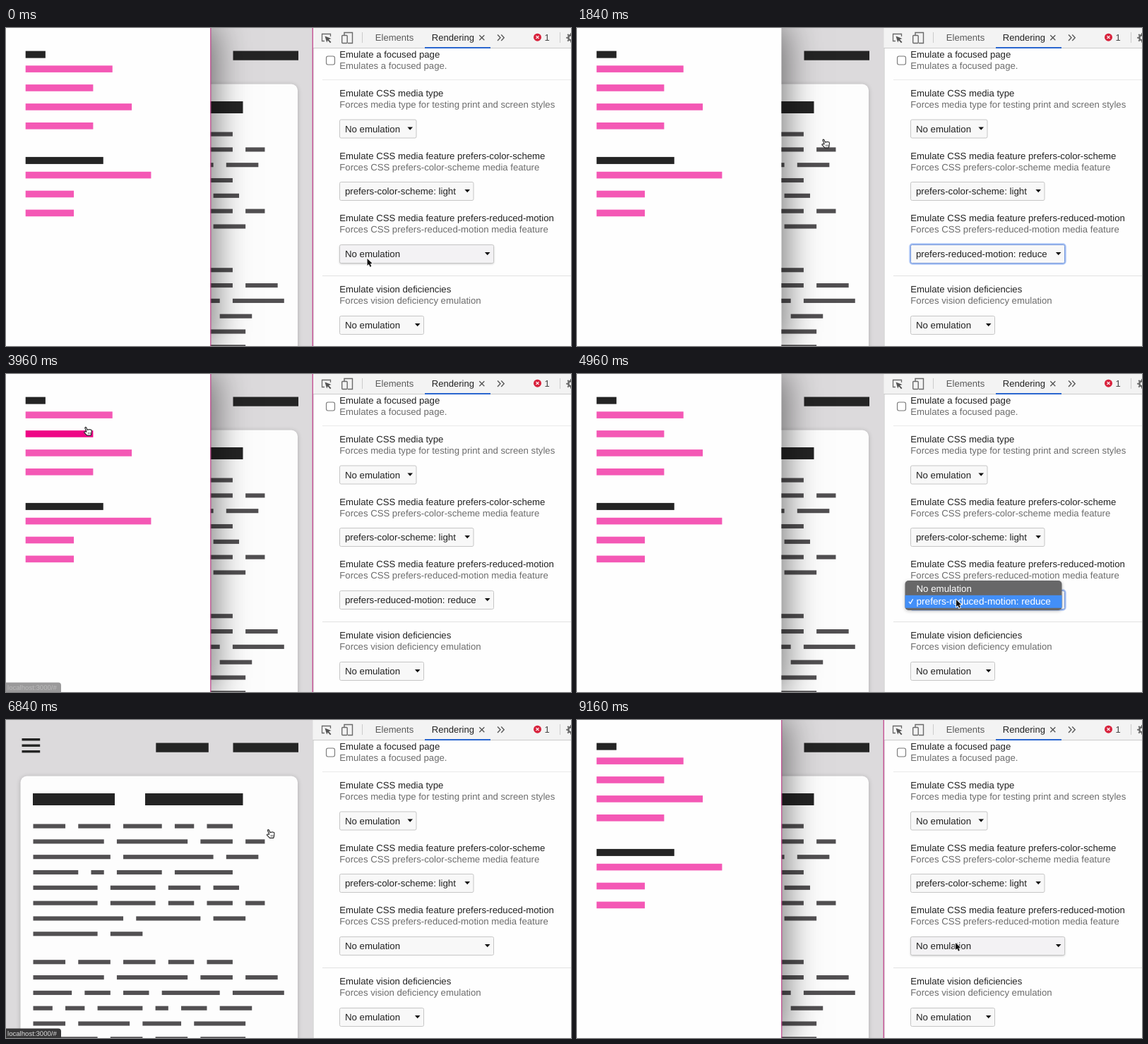
Animation of 800x451 px, one loop 9200 ms. Source, as an HTML page with a canvas:

```html
<!DOCTYPE html>
<html lang="en">
<head>
<meta charset="utf-8">
<title>Sidenav and reduced motion</title>
<style>
html, body { margin: 0; width: 100%; height: 100%; overflow: hidden; background: #fff; }
canvas { display: block; width: 800px; height: 451px; }
</style>
</head>
<body>
<canvas id="stage" width="800" height="451"></canvas>
<script>
const ctx = document.getElementById('stage').getContext('2d');
const LOOP = 9200, STEP = 40;
const PAGE_W = 434.5, NAV_W = 289.3;
const SLIDE = 600, AWAY = -478;
const INK = '#242424', PINK = '#f458b5', HOT = '#ee0585', RING = '#c2478f';
const SANS = '"Liberation Sans", Arial, sans-serif';

// Moments of each click
const AT = {
  menu1: 400, pick1: 1040, close1: 2250, open1: 3450,
  menu2: 4740, pick2: 5600, close2: 6520, open2: 7870
};

// Pointer path: time, x, y
const PATH = [
  [0, 511.5, 327], [360, 519, 322], [480, 519, 322], [860, 542, 338], [1160, 542, 338],
  [1800, 348.5, 157.5], [2400, 349, 157.5], [2960, 47.5, 37], [3760, 48, 37.5],
  [4640, 537, 321], [5020, 537, 320], [5400, 532, 303], [5720, 532, 303],
  [6260, 371, 155], [6880, 371, 155], [7500, 50, 40], [7720, 50, 40],
  [8100, 53.5, 44], [8320, 53.5, 44], [9000, 536, 316], [LOOP, 536, 316]
];

// Word lengths, line by line
const PARAGRAPHS = [
  [150.5, '5 5 6 3 4|11 11 5 3|12 14 5|7 2 7 9|10 7 5 4|10 7 4 4 3|14 10 5|10 5'],
  [343.2, '5 5 5 4 4|11 11 5 5|6 4 4 9 8|3 3 7 2 4 5|5 8 6 8|10 5 5 7']
];
const NAV_ITEMS = [
  [37.6, 2.06, 'head'], [58.1, 9], [84.9, 7], [111.9, 11], [138.8, 7],
  [187.9, 8.05, 'head'], [208.6, 13], [235.5, 5], [262.4, 5]
];

const between = (t, a, b) => t >= a && t < b;
const clamp = v => Math.max(0, Math.min(1, v));
const fade = (t, a, b, d = 120) => clamp((t - a) / d) * clamp((b + d - t) / d);

function bar(x, y, w, h, color) {
  ctx.fillStyle = color;
  ctx.fillRect(x, y, w, h);
}

function round(x, y, w, h, r, fill, stroke, lw = 1) {
  ctx.beginPath();
  ctx.roundRect(x, y, w, h, r);
  if (fill) { ctx.fillStyle = fill; ctx.fill(); }
  if (stroke) { ctx.strokeStyle = stroke; ctx.lineWidth = lw; ctx.stroke(); }
}

function line(points, color, lw = 1) {
  ctx.beginPath();
  points.forEach(([x, y], i) => i ? ctx.lineTo(x, y) : ctx.moveTo(x, y));
  ctx.strokeStyle = color;
  ctx.lineWidth = lw;
  ctx.stroke();
}

function label(str, x, y, color = '#222', size = 13.16) {
  ctx.font = `${size}px ${SANS}`;
  ctx.textRendering = 'geometricPrecision';
  ctx.fillStyle = color;
  ctx.fillText(str, x, y);
}

function shadow(color, blur, dy = 0) {
  ctx.shadowColor = color;
  ctx.shadowBlur = blur;
  ctx.shadowOffsetY = dy;
}

// cubic-bezier(.16, 1, .3, 1)
function easeOutExpo(p) {
  if (p <= 0) return 0;
  if (p >= 1) return 1;
  let lo = 0, hi = 1;
  for (let i = 0; i < 24; i++) {
    const s = (lo + hi) / 2, q = 1 - s;
    if (0.48 * s * q * q + 0.9 * s * s * q + s * s * s < p) lo = s; else hi = s;
  }
  return 1 - (1 - lo) ** 3;
}

function navOffset(t) {
  if (between(t, AT.close1, AT.open1)) return AWAY;
  if (between(t, AT.close2, AT.open2)) return AWAY * easeOutExpo((t - AT.close2) / SLIDE);
  if (t >= AT.open2) return AWAY * (1 - easeOutExpo((t - AT.open2) / SLIDE));
  return 0;
}

function pointerAt(t) {
  const i = Math.max(1, PATH.findIndex(k => k[0] > t));
  const [t0, x0, y0] = PATH[i - 1], [t1, x1, y1] = PATH[i];
  const p = (t - t0) / (t1 - t0), e = p * p * (3 - 2 * p);
  return { x: x0 + (x1 - x0) * e, y: y0 + (y1 - y0) * e };
}

const overBurger = (mouse, navX) =>
  navX < -300 && Math.hypot(mouse.x - 35, mouse.y - 36) < 28;

function overLink(mouse, navX, [y, n, head]) {
  const dx = mouse.x - navX - 27.7;
  return !head && between(dx, 0, n * 13.67) && Math.abs(mouse.y + 2 - y) < 13.4;
}

function drawPage(t, mouse, navX) {
  bar(0, 0, PAGE_W, 451, '#dcdadc');

  const focused = between(t, AT.close1, AT.open1) || between(t, AT.close2 + SLIDE, AT.open2);
  if (focused || overBurger(mouse, navX)) {
    ctx.beginPath();
    ctx.arc(35, 36, 28.3, 0, 7);
    ctx.fillStyle = '#e5c0d2';
    ctx.fill();
    ctx.strokeStyle = '#dda5c0';
    ctx.lineWidth = 1.2;
    ctx.stroke();
  }
  for (let i = 0; i < 3; i++) bar(22.5, 26 + i * 8.5, 25.7, 3.4, INK);
  bar(212.3, 32.5, 74.5, 13.2, INK);
  bar(321.5, 32.5, 92.5, 13.2, INK);

  shadow('rgba(0,0,0,.22)', 6, 1);
  round(20.5, 79.5, 392.5, 400, 9, '#fdfdfd');
  shadow('transparent', 0);
  bar(38, 104, 116, 17, INK);
  bar(197, 104, 138.5, 17, INK);
  for (const [top, text] of PARAGRAPHS) {
    text.split('|').forEach((row, i) => {
      let x = 38.5;
      for (const n of row.split(' ')) {
        bar(x, top + i * 21.82 - 3, n * 9.11, 6.1, '#525052');
        x += (+n + 2) * 9.11;
      }
    });
  }
}

function drawNav(mouse, navX) {
  if (navX < -350) return;
  // Soft shadow cast on the page, to the right of the panel
  ctx.save();
  ctx.beginPath();
  ctx.rect(Math.max(0, navX + NAV_W), 0, PAGE_W, 451);
  ctx.clip();
  shadow('rgba(0,0,0,.55)', 48);
  ctx.shadowOffsetX = 1000;
  bar(navX - 1000, -4, NAV_W + 6, 459, '#000');
  ctx.restore();

  bar(navX, 0, NAV_W, 451, '#fefefe');
  for (const item of NAV_ITEMS) {
    const [y, n, head] = item, h = head ? 10 : 9.6;
    const color = head ? INK : overLink(mouse, navX, item) ? HOT : PINK;
    bar(navX + 27.7, y - h / 2, n * 13.67, h, color);
  }
}

function drawStatus(t) {
  const shows = [
    ['', fade(t, 1860, 2420)],
    ['sidenav-open', fade(t, 2980, 3500)],
    ['', fade(t, 3900, 4160)],
    ['', fade(t, 6220, 6960)],
    ['sidenav-open', fade(t, 7480, 7900, 80)],
    ['', fade(t, 7980, 8440)]
  ];
  for (const [hash, alpha] of shows) {
    if (alpha <= 0) continue;
    ctx.globalAlpha = alpha;
    round(-5, 437.5, hash ? 139 : 83, 20, 4, '#383738');
    label('localhost:3000/#' + hash, 2, 448.3, '#dedede', 9.6);
    ctx.globalAlpha = 1;
  }
}

function drawSelect(x, y, w, text, state) {
  if (state === 'focus') round(x - 1, y - 1, w + 2, 28, 3.5, null, '#a7c2f5', 2.4);
  if (state === 'hover') shadow('rgba(0,0,0,.25)', 3, 1);
  round(x, y, w, 26, 2, state === 'hover' ? '#f3f2f4' : '#f8f8f8');
  shadow('transparent', 0);
  round(x, y, w, 26, 2, null, state === 'focus' ? '#7798da' : '#c6c6c6');
  label(text, x + 7.4, y + 17.6, '#222', 13.28);
  const ax = x + w - 8.8, ay = y + 10.4;
  ctx.beginPath();
  ctx.moveTo(ax - 3.8, ay);
  ctx.lineTo(ax + 3.8, ay);
  ctx.lineTo(ax, ay + 4.3);
  ctx.fillStyle = '#111';
  ctx.fill();
}

function drawToolbar() {
  bar(PAGE_W, 0, 366, 28, '#f3f3f3');
  bar(PAGE_W, 28, 366, 1, '#cbcbcb');
  bar(593, 27, 93, 2, '#2a66cf');

  const gray = '#6a6a6a';
  line([[451, 18.5], [447.5, 18.5], [447.5, 8.5], [459.5, 8.5], [459.5, 12]], gray, 1.3);
  ctx.beginPath();
  [[451.5, 11.5], [460.5, 15], [457, 16.2], [460.5, 20], [459, 21.3], [455.6, 17.6], [454.2, 20.6]]
    .forEach(p => ctx.lineTo(...p));
  ctx.fillStyle = '#555';
  ctx.fill();
  line([[479, 10], [479, 6.5], [490.5, 6.5], [490.5, 21.5], [484, 21.5]], gray, 1.4);
  round(475.7, 10.5, 7.5, 11, 1, '#f3f3f3', gray, 1.4);
  bar(504, 6, 1, 15, '#cccccc');

  label('Elements', 522.8, 18.2, '#5a5a5a', 13.05);
  label('Rendering', 602.8, 18.2, '#222', 13.05);
  line([[670.3, 10.3], [677.3, 17.3]], '#555', 1.3);
  line([[677.3, 10.3], [670.3, 17.3]], '#555', 1.3);
  for (const x of [696, 701.2]) line([[x, 9.5], [x + 4, 13.7], [x, 18]], '#5a5a5a', 1.4);

  ctx.beginPath();
  ctx.arc(752.5, 13.2, 5.5, 0, 7);
  ctx.fillStyle = '#d8213b';
  ctx.fill();
  line([[750.5, 11.2], [754.5, 15.2]], '#fff', 1.2);
  line([[754.5, 11.2], [750.5, 15.2]], '#fff', 1.2);
  label('1', 762.5, 18.2, '#444', 13);
  bar(784, 6, 1, 15, '#cccccc');

  ctx.beginPath();
  ctx.arc(800, 13.8, 3.7, 0, 7);
  ctx.strokeStyle = gray;
  ctx.lineWidth = 2.6;
  ctx.stroke();
  for (let i = 0; i < 8; i++) {
    const c = Math.cos(i * Math.PI / 4), s = Math.sin(i * Math.PI / 4);
    line([[800 + c * 4.5, 13.8 + s * 4.5], [800 + c * 6.8, 13.8 + s * 6.8]], gray, 2);
  }
}

function drawPanel(t, mouse) {
  bar(PAGE_W, 0, 366, 451, '#fefefe');
  bar(PAGE_W, 0, 1, 451, '#c6c5c6');
  drawToolbar();
  round(453.5, 40, 12, 12, 2.5, '#fff', '#777', 1.1);
  bar(448, 73, 352, 1, '#e9e9e9');
  bar(448, 351, 352, 1, '#e2e2e2');

  const rows = [
    [42.3, 'Emulate a focused page', 'Emulates a focused page.'],
    [96.8, 'Emulate CSS media type', 'Forces media type for testing print and screen styles'],
    [185.6, 'Emulate CSS media feature prefers-color-scheme', 'Forces CSS prefers-color-scheme media feature'],
    [274.4, 'Emulate CSS media feature prefers-reduced-motion', 'Forces CSS prefers-reduced-motion media feature'],
    [375.4, 'Emulate vision deficiencies', 'Forces vision deficiency emulation']
  ];
  for (const [y, title, note] of rows) {
    label(title, 472.3, y);
    label(note, 472.3, y + 16, '#6c6c6c');
  }

  const reduce = between(t, AT.pick1, AT.pick2);
  const focus = between(t, AT.menu1, AT.close1) || between(t, AT.menu2, AT.close2);
  const over = between(mouse.x, 472, 691) && between(mouse.y, 307, 334);
  drawSelect(472.5, 130, 108.5, 'No emulation');
  drawSelect(472.5, 218.5, 189.5, 'prefers-color-scheme: light');
  drawSelect(472.5, 307.5, 218, reduce ? 'prefers-reduced-motion: reduce' : 'No emulation',
    focus ? 'focus' : over ? 'hover' : '');
  drawSelect(472.5, 408.5, 119, 'No emulation');
}

function drawMenu(t, mouse) {
  const first = t < AT.close1;
  const alpha = first ? fade(t, AT.menu1, AT.pick1, 80) : fade(t, AT.menu2, AT.pick2, 80);
  if (alpha <= 0) return;
  const top = first ? 310.6 : 293, chosen = first ? 0 : 1;
  const active = mouse.y < top + 21 ? 0 : 1;
  ctx.globalAlpha = alpha;
  shadow('rgba(0,0,0,.28)', 5, 1);
  round(464.5, top, 222, 42, 5, '#676768');
  shadow('transparent', 0);
  bar(464.5, top + 3 + active * 17.8, 222, 18, '#438ff7');
  label('No emulation', 480.5, top + 16.4, '#fff', 13.3);
  label('prefers-reduced-motion: reduce', 480.5, top + 34, '#fff', 13.6);
  const cy = top + 12 + chosen * 17.8;
  line([[470, cy], [472, cy + 2.8], [475.6, cy - 3.6]], '#fff', 1.3);
  ctx.globalAlpha = 1;
}

function drawArrow({ x, y }) {
  ctx.beginPath();
  [[0, 0], [0, 10], [2.3, 8], [4, 11.8], [5.8, 11], [4.2, 7.3], [7.2, 7.1]]
    .forEach(([dx, dy]) => ctx.lineTo(x + dx, y + dy));
  ctx.closePath();
  ctx.strokeStyle = '#fff';
  ctx.lineWidth = 1.6;
  ctx.stroke();
  ctx.fillStyle = '#111';
  ctx.fill();
}

function drawHand({ x, y }) {
  ctx.save();
  ctx.translate(x - 1.8, y);
  ctx.beginPath();
  ctx.moveTo(3.6, 7.4);
  ctx.lineTo(1.3, 1.7);
  ctx.quadraticCurveTo(1.6, -0.1, 3.1, 1);
  ctx.lineTo(4.8, 4.8);
  ctx.quadraticCurveTo(6, 3.4, 7, 4.4);
  ctx.quadraticCurveTo(8.2, 3.2, 9, 4.3);
  ctx.quadraticCurveTo(10.6, 3.8, 10.7, 6);
  ctx.lineTo(10.4, 9.5);
  ctx.lineTo(9.6, 12.4);
  ctx.lineTo(4.2, 12.4);
  ctx.lineTo(0.2, 8.2);
  ctx.quadraticCurveTo(0.2, 6.2, 3.6, 7.4);
  ctx.fillStyle = '#fff';
  ctx.fill();
  ctx.strokeStyle = '#222';
  ctx.lineWidth = 1.1;
  ctx.lineJoin = 'round';
  ctx.stroke();
  for (const dx of [5.8, 7.3, 8.8]) line([[dx, 8], [dx, 10.4]], '#444', 0.7);
  ctx.restore();
}

function drawPointer(t, mouse, navX) {
  const overlay = navX > -1 && between(mouse.x, NAV_W, PAGE_W);
  const resting = between(t, AT.close1, 2440) || between(t, AT.close2, 6920);
  const link = NAV_ITEMS.some(item => overLink(mouse, navX, item));
  (overlay || resting || link || overBurger(mouse, navX) ? drawHand : drawArrow)(mouse);
}

function draw(t) {
  const mouse = pointerAt(t), navX = navOffset(t);
  ctx.save();
  ctx.beginPath();
  ctx.rect(0, 0, PAGE_W, 451);
  ctx.clip();
  drawPage(t, mouse, navX);
  drawNav(mouse, navX);
  drawStatus(t);
  ctx.restore();

  drawPanel(t, mouse);
  if (t < AT.menu1 || between(t, AT.open1, AT.menu2) || t >= AT.open2 + SLIDE) {
    bar(289.2, 0, 1.2, 451, RING);
    bar(433.6, 0, 1.3, 451, RING);
  }
  drawMenu(t, mouse);
  drawPointer(t, mouse, navX);
}

function tick() {
  draw(Math.floor(performance.now() % LOOP / STEP) * STEP);
  requestAnimationFrame(tick);
}
tick();
</script>
</body>
</html>
```
